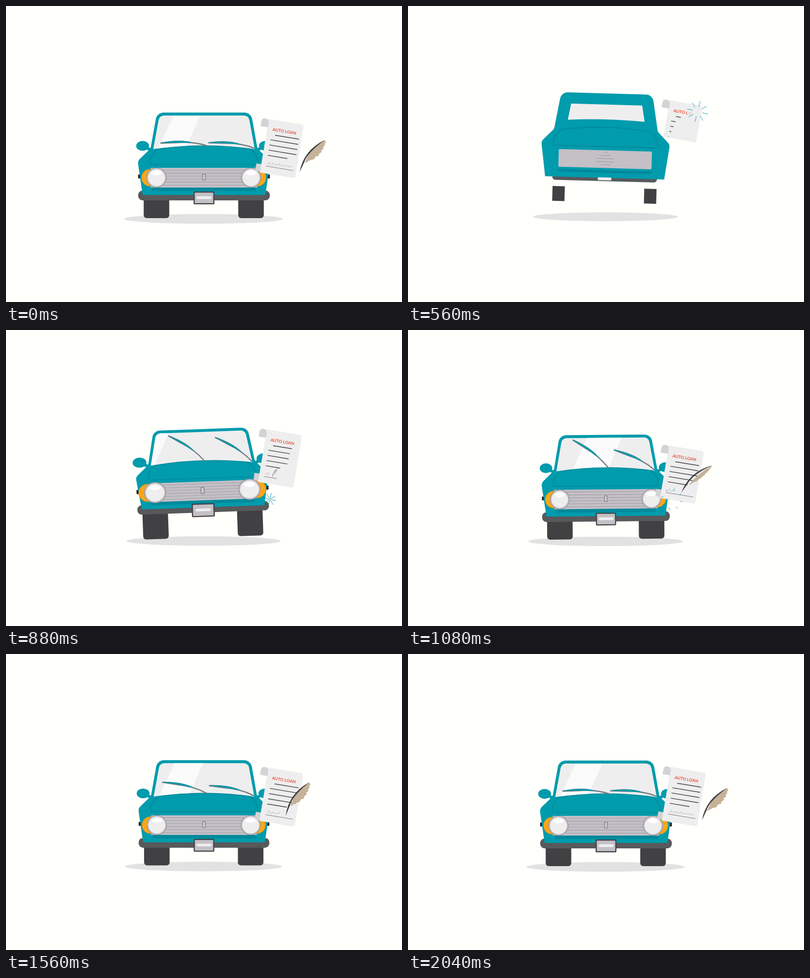
Animation of 800x600 px, one loop 2.08 s. Source, as an HTML page with a canvas:

```html
<!DOCTYPE html>
<html lang="en">
<head>
<meta charset="utf-8">
<title>Auto loan</title>
<style>
html, body { margin: 0; width: 100%; height: 100%; overflow: hidden; background: #fffffc; }
canvas { display: block; }
</style>
</head>
<body>
<canvas id="stage" width="800" height="600"></canvas>
<script>
const c = document.getElementById('stage').getContext('2d');
const LOOP = 2080, STEP = 40;
const TEAL = '#009bac', SHADE = 'rgba(0,30,50,.14)', DARK = '#414042',
      LIGHT = '#eeeeef', SILVER = '#c4c0c6', CURL = '#d2d3d4';

// Shared state of the scene, worked out once per frame
let t, born, open, full, hop, low, squash, tilt;

const mix = (a, b, p) => a + (b - a) * p;
const span = (a, b) => Math.max(0, Math.min(1, (t - a) / (b - a)));
const ease = (a, b) => span(a, b) ** 2 * (3 - 2 * span(a, b));
const pop = (a, b) => {
  const p = span(a, b) - 1;
  return 1 + 2.7 * p ** 3 + 1.7 * p ** 2;
};
// Value as a part goes from sliver to plain shape to finished shape
const at = (sliver, plain, done) => mix(mix(sliver, plain, open), done, full);
const size = (...stages) => born * at(...stages);

// Eased path through a few (time, value) points
function path(...points) {
  let v = points[1];
  for (let i = 2; i < points.length; i += 2) v = mix(v, points[i + 1], ease(points[i - 2], points[i]));
  return v;
}

function update() {
  born = ease(260, 360);
  open = ease(360, 560);
  full = ease(560, 840);
  hop = ease(360, 640) - ease(640, 1120);
  low = 1 - ease(1080, 1800);
  squash = ease(620, 860) - ease(900, 1080);
  tilt = path(360, -4.5, 560, 1.6, 880, -2, 1080, -.5, 1300, 0);
}

function group(x, y, deg, sx, sy, draw) {
  if (sx <= 0 || sy <= 0) return;
  c.save();
  c.translate(x, y);
  c.rotate(deg * Math.PI / 180);
  c.scale(sx, sy);
  draw();
  c.restore();
}
function shape(color, d) {
  c.fillStyle = color;
  c.fill(new Path2D(d));
}
function line(color, width, d) {
  c.strokeStyle = color;
  c.lineWidth = width;
  c.stroke(new Path2D(d));
}
function oval(color, x, y, rx, ry = rx) {
  c.beginPath();
  c.ellipse(x, y, rx, ry, 0, 0, 7);
  c.fillStyle = color;
  c.fill();
}
// Rounded box given by centre and half sizes
function box(color, x, y, w, h, r = 0) {
  if (w <= 0 || h <= 0) return;
  c.beginPath();
  c.roundRect(x - w, y - h, 2 * w, 2 * h, Math.min(r, w, h));
  c.fillStyle = color;
  c.fill();
}
function both(draw) { [-1, 1].forEach(draw); }

function shadow() {
  const rx = born * (at(78, 150, 160) - 4 * low);
  c.globalAlpha = at(.55, 1, 1);
  oval('#e2e2e3', 399, 431.5 - 3 * low - 1.5 * hop, rx, rx * .0615);
  c.globalAlpha = 1;
}

function wheels(x, sx) {
  const y = at(392.5, 394.5, 402.5) - 6 * low - 7 * hop;
  both(d => group(x + 95.5 * d * sx, y + 1.7 * tilt * d * open, tilt * open, 1, 1, () =>
    box(DARK, 0, 0, size(3.5, 12.4, 25.8), size(5, 15, 27.5), 6 * full)));
}

function body() {
  const x = at(392, 400, 400);
  const half = [[59, 95, 258, 216, 16], [65, 108, 284, 289, 10], [82, 134, 307, 314, 12], [82, 124, 307, 383, 0]]
    .map(([w, W, y, Y, r]) => [born * mix(w, W, open), mix(283, mix(y, Y, open), born), r * open]);
  const pts = [...half.map(([w, y, r]) => [x + w, y, r]),
               ...half.reverse().map(([w, y, r]) => [x - w, y, r])];
  c.beginPath();
  c.moveTo(x, pts[0][1]);
  pts.forEach(([px, py, r], i) => {
    const [nx, ny] = pts[(i + 1) % 8];
    c.arcTo(px, py, nx, ny, r);
  });
  c.closePath();
  c.fillStyle = TEAL;
  c.fill();
}

function windshield() {
  const x = at(386, 400, 400), y = at(244, 254, 256);
  const top = size(79, 74, 90), base = size(79, 80, 102.5), h = size(2.5, 16, 34), r = 11 * full;
  c.save();
  c.beginPath();
  c.moveTo(x, y - h);
  c.arcTo(x + top, y - h, x + base, y + h, r);
  c.lineTo(x + base, y + h);
  c.quadraticCurveTo(x, y + h - at(4, 5, 15), x - base, y + h);
  c.arcTo(x - top, y - h, x, y - h, r);
  c.closePath();
  c.fillStyle = LIGHT;
  c.fill();
  c.clip();
  const left = path(720, 200, 880, 263, 1080, 362, 1640, 339);
  if (full > .5) shape('#fbfbfc', `M${left} 221h${54 + 19 * low}l-32 70h${-54 - 19 * low}Z`);
  c.restore();
}

function hood() {
  const x = at(384, 400, 400), a = at(273, 290, 290), b = at(302, 321, 321);
  const w = size(100, 109, 109), v = size(84, 92, 92);
  const l = x - w, r = x + w;
  line(SHADE, 1.6, `M${x - v} ${a}Q${x} ${a - 14} ${x + v} ${a}`);
  if (open < .5) line(SHADE, 1.6, `M${l} ${b}Q${x} ${b - 4} ${r} ${b}`);
  else line(SHADE, 1.6, `M${x - v} ${a}Q${l} ${a + 9} ${l} ${b - 4}q0 4 4 4H${r - 4}q4 0 4 -4Q${r} ${a + 9} ${x + v} ${a}`);
}

function grille() {
  const x = at(391, 400, 400), grown = span(500, 800);
  box(SHADE, x, at(345, 370.5, 371), size(55, 98, 105), size(2, 2.6, 4), 3);
  box(SILVER, x, at(324, 346, 348), size(92, 97, 108), size(3, 17.5, 20), 2);
  for (let i = -2.5; i < 3; i++) {
    const w = 106 * grown - Math.abs(i) * 8 * (1 - grown);
    if (w > 0) line('#a19ea6', 1.1, `M${400 - w} ${348 + i * 6.1}h${2 * w}`);
  }
  const s = pop(640, 1080);
  group(400, 347, 0, s, s, () => {
    box('#77747c', 0, 0, 3.4, 6.5, 1);
    box('#cfccd1', 0, 0, 2.2, 5.3);
  });
}

function lamps() {
  const s = pop(620, 1080);
  both(d => group(399.5 + 95.5 * d, 348, 0, s, s, () => {
    oval('#d9901c', 13 * d, 0, 17.6);
    oval('#faa61a', 13 * d, 0, 16.8);
    oval('#96939b', 0, 0, 20.3);
    oval('#c9c7cb', 0, 0, 19);
    oval(LIGHT, 0, 0, 17);
    oval('#fff', 0, -9.5, 10.5, 4.5);
  }));
}

function wiper(x, y, angle) {
  const s = ease(560, 920);
  group(x, y, angle, s, s, () => {
    c.lineCap = 'round';
    line('#77787b', 2.4, 'M-92 -5L-60 -6Q-28 -9 0 0');
    line('#77787b', 1, 'M-92 -6Q-48 -14 -25 -5');
    shape(TEAL, 'M-92 -6Q-48 -14 -25 -5Q-50 -7 -92 -5Z');
    c.lineCap = 'butt';
  });
}

function plate() {
  const s = pop(600, 1080);
  group(400, 389, 0, s, s, () => {
    box(DARK, 0, 0, 21, 13, 2);
    box(SILVER, 0, 0, 18.8, 10.8, 1);
  });
  box(LIGHT, at(395, 400, 400), at(358, 385, 388.5), size(13, 14.5, 15.5), size(2.6, 2.8, 2.8), 3);
}

function car() {
  const x = 400 - 3.5 * hop, y = 383 - 5 * low - 37 * hop;
  const sx = 1 - .03 * low + .03 * squash;
  const sy = 1 + .05 * hop - .015 * low - .06 * squash;
  wheels(x - .5, sx);
  group(x, y, tilt, sx, sy, () => {
    c.translate(-400, -383);
    const mark = pop(640, 1080), mirror = pop(560, 1000);
    both(d => {
      group(400 + 129 * d, 345.5, 0, mark, mark, () => box('#231f20', 0, 0, 4, 4, 1));
      group(400 + 106 * d, 291, 0, mirror, mirror, () => {
        oval(TEAL, 18 * d, -7.5, 13, 10);
        line(TEAL, 6, `M${12 * d} -4L${-2 * d} 2`);
      });
    });
    box('#58595b', at(395, 400, 400), at(358, 383.5, 384), size(23, 109, 133), size(5, 6, 10), 9);
    body();
    windshield();
    hood();
    grille();
    lamps();
    wiper(405, 283, 35 * (ease(560, 880) - ease(1080, 1840)));
    wiper(501, 288, 3.5 + 24 * (ease(560, 860) - ease(860, 1340)) + 6 * (1 - ease(1560, 1900)));
    plate();
  });
}

function title() {
  const text = 'AUTO LOAN', n = text.length * ease(420, 640), whole = Math.floor(n);
  const typed = text.slice(0, whole);
  c.font = 'bold 8.4px Lato, sans-serif';
  c.fillStyle = '#ee5035';
  c.fillText(typed, 10.8, 22.4);
  c.globalAlpha = n - whole;
  c.fillText(text.charAt(whole), 10.8 + c.measureText(typed).width, 22.4);
  c.globalAlpha = 1;
}

function textLines() {
  const p = span(450, 1000);
  for (let i = 0; i < 5; i++) {
    const from = i ? 10 : 18, to = i < 4 ? 67 : 50;
    const grown = Math.max(0, p - .055 * i * (1 - p));
    line(DARK, 1.4, `M${from} ${30.4 + 10.65 * i}h${(to - from) * grown}`);
  }
  line('#77787b', .9, `M10 95h${56 * ease(700, 1080)}`);
}

function signature() {
  const end = path(840, 12, 880, 20, 1080, 28, 1560, 38, 1720, 62);
  c.beginPath();
  for (let x = 12; x < end; x += .5) {
    const tall = x < 36 ? 3 : 1.4;
    c.lineTo(x + 1.6 * Math.cos(x * .9), 88.5 + tall * Math.sin(x * .85) * Math.cos(x * .17));
  }
  c.strokeStyle = '#b4b5b8';
  c.lineWidth = .8;
  c.stroke();
}

function paper() {
  const x = at(507, 529, 527) + 4 * (1 - low);
  const y = path(360, 194, 560, 191, 880, 201.5, 1080, 234, 1800, 229);
  const w = at(75, 67, 72), h = at(22, 75, 108) + 2 * (1 - low);
  group(x, y, at(.8, 10, 9.5), born, born, () => {
    group(0, h - 9, 0, full, full, () => shape(CURL, 'M-10 -8H5V7H-6Q-10 7 -10 3Z'));
    c.beginPath();
    c.roundRect(0, 0, w, h, [0, 5 * full, 5 * full, 0]);
    c.fillStyle = LIGHT;
    c.fill();
    shape(CURL, 'M-14 17V7Q-14 0 -6 0Q1 0 1 8V17Z');
    title();
    textLines();
    signature();
  });
}

function quill() {
  const s = ease(800, 1040);
  const x = path(880, 538, 1080, 552, 1560, 565, 1700, 577, 1840, 604, 2080, 593);
  const y = path(880, 299, 1080, 330, 1560, 327, 1840, 337);
  const wiggle = Math.sin(span(1080, 1700) * Math.PI * 6);
  group(x, y + wiggle, path(880, -60, 1080, -42, 1560, -55, 2080, -52), s, s, () => {
    group(0, 0, 0, 1, mix(.5, 1, ease(1080, 1560)), () =>
      shape('#c5b299', 'M83 0L80 5L76 4L75 7L70 6L67 9L62 7L60 10L54 8L50 10L45 6L39 7L33 2L21 -3Q50 -14 83 0Z'));
    shape(DARK, 'M0 0Q40 -21 83 0Q40 -12 22 -5Z');
  });
}

function burst(x, y, start) {
  const p = span(start, start + 310);
  const outer = 22 * (1 - (1 - p) ** 3), inner = 22 * p * p;
  for (let i = 0; i < 8; i++) {
    const a = i * Math.PI / 4 + .25, u = Math.cos(a), v = Math.sin(a);
    line(TEAL, .9, `M${x + u * inner} ${y + v * inner}L${x + u * outer} ${y + v * outer}`);
  }
}

function frame(now) {
  // The loop opens on the finished picture.
  t = Math.floor(now % LOOP / STEP) * STEP || LOOP;
  update();
  c.fillStyle = '#fffffc';
  c.fillRect(0, 0, 800, 600);
  shadow();
  if (born) car();
  paper();
  quill();
  burst(585, 214, 350);
  burst(533, 343, 800);
  requestAnimationFrame(frame);
}
frame(0);
</script>
</body>
</html>
```
